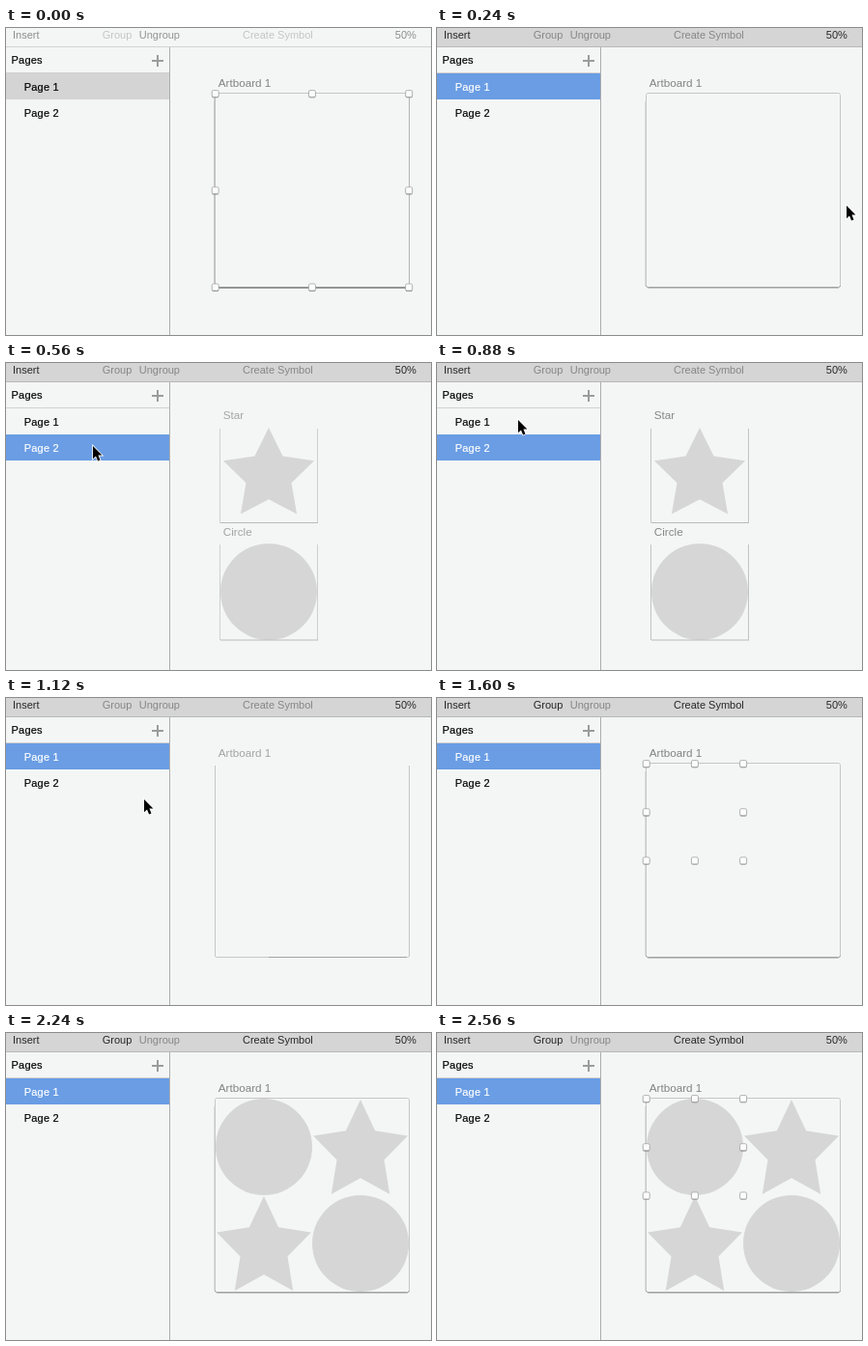
These frames come from a looping animation (440 by 318 pixels, 2880 ms). An HTML page:

```html
<!DOCTYPE html>
<html lang="en">
<head>
<meta charset="utf-8">
<title>Symbol pages</title>
<style>
html, body { margin: 0; width: 100%; height: 100%; overflow: hidden; background: #f4f6f5; }
svg { display: block; width: 440px; height: 318px; }
text { font: 11px "Liberation Sans", Arial, sans-serif; }
.side text { letter-spacing: .18px; fill: #000; stroke: #000; stroke-width: .2px; }
.name { font-size: 11.7px; fill: #828282; }
.shape { fill: #d6d6d6; }
.line { fill: none; stroke: #c6c6c6; }
.base { stroke: #a2a2a2; }

/* 80 ms is 2.7778 % of the loop */
svg * { animation: 2880ms step-end infinite; }
.bar { animation-name: bar; }
.edge { animation-name: edge; }
.dark { animation-name: dark; }
.action { animation-name: action; }
.ungroup { animation-name: ungroup; }
.row1 { animation-name: row1; }
.row2 { animation-name: row2; }
.side .label1 { animation-name: label1; }
.side .label2 { animation-name: label2; }
.board { animation-name: board; }
.full { animation-name: full; }
.faint { animation-name: faint; }
.boardName { animation-name: boardName; }
.boardHandles { animation-name: boardHandles; }
.symbols { animation-name: symbols; }
.symbols .name { animation-name: symbolName; }
.symbols .line { animation-name: symbolLine; }
.fill { animation-name: fill; }
.pick { animation-name: pick; }
.cursor { animation-name: cursor; }

@keyframes bar { 0% { fill: #f4f6f5; } 8.333%, 100% { fill: #d5d5d5; } }
@keyframes edge { 0% { fill: #d2d2d2; } 8.333%, 100% { fill: #b9b9b9; } }
@keyframes dark { 0% { fill: #8c8c8c; } 8.333%, 100% { fill: #262626; } }
@keyframes action { 0% { fill: #c4c4c4; } 8.333% { fill: #868686; } 55.556%, 100% { fill: #262626; } }
@keyframes ungroup { 0% { fill: #929292; } 8.333%, 100% { fill: #868686; } }
@keyframes row1 {
  0% { fill: #d4d4d4; } 8.333% { fill: #6a9de4; }
  19.444% { fill: transparent; } 38.889%, 100% { fill: #6a9de4; }
}
@keyframes row2 { 0% { fill: transparent; } 19.444% { fill: #6a9de4; } 38.889%, 100% { fill: transparent; } }
@keyframes label1 {
  0% { fill: #000; stroke: #000; } 8.333% { fill: #fff; stroke: #fff; }
  19.444% { fill: #000; stroke: #000; } 38.889%, 100% { fill: #fff; stroke: #fff; }
}
@keyframes label2 {
  0% { fill: #000; stroke: #000; } 19.444% { fill: #fff; stroke: #fff; }
  38.889%, 100% { fill: #000; stroke: #000; }
}
@keyframes board { 0% { visibility: visible; } 19.444% { visibility: hidden; } 38.889%, 100% { visibility: visible; } }
@keyframes full { 0% { opacity: 1; } 38.889% { opacity: 0; } 41.667%, 100% { opacity: 1; } }
@keyframes faint { 0% { opacity: 0; } 38.889% { opacity: 1; } 41.667%, 100% { opacity: 0; } }
@keyframes boardName { 0% { fill: #828282; } 38.889% { fill: #a3a3a3; } 41.667%, 100% { fill: #828282; } }
@keyframes boardHandles { 0% { opacity: 1; } 8.333%, 100% { opacity: 0; } }
@keyframes symbols { 0% { opacity: 0; } 19.444% { opacity: 1; } 38.889%, 100% { opacity: 0; } }
@keyframes symbolName { 0% { fill: #a3a3a3; } 22.222%, 100% { fill: #868686; } }
@keyframes symbolLine { 0% { stroke: #cfcfcf; } 22.222%, 100% { stroke: #c2c2c2; } }
@keyframes fill { 0% { opacity: 0; } 77.778%, 100% { opacity: 1; } }
@keyframes pick { 0% { opacity: 0; } 55.556% { opacity: 1; } 77.778% { opacity: 0; } 88.889%, 100% { opacity: 1; } }
@keyframes cursor {
  0% { opacity: 0; transform: translate(424px, 184px); }
  8.333% { opacity: 1; transform: translate(424px, 184px); }
  11.111% { transform: translate(345px, 160px); }
  13.889% { transform: translate(220px, 122px); }
  16.667% { transform: translate(122px, 94px); }
  19.444% { transform: translate(90px, 86px); }
  25% { transform: translate(89px, 84px); }
  27.778% { transform: translate(86px, 70px); }
  30.556% { transform: translate(84px, 59px); }
  38.889% { transform: translate(143px, 105px); }
  41.667% { transform: translate(190px, 114px); }
  44.444% { transform: translate(232px, 118px); }
  47.222% { transform: translate(256px, 119px); }
  50% { opacity: 1; transform: translate(265px, 119px); }
  55.556%, 100% { opacity: 0; transform: translate(265px, 119px); }
}
</style>
</head>
<body>
<svg viewBox="0 0 440 318">
  <defs>
    <g id="handle">
      <rect x="-3.5" y="-2.8" width="7" height="7" rx="1.5" fill="#777"/>
      <rect x="-3.5" y="-3.5" width="7" height="7" rx="1.5" fill="#fcfcfc" stroke="#a6a6a6" stroke-width=".8"/>
    </g>
  </defs>

  <rect width="440" height="318" fill="#f4f6f5"/>

  <g class="board">
    <g class="full">
      <path class="line" d="M216.5 268V69.5Q216.5 67.5 218.5 67.5H415.5Q417.5 67.5 417.5 69.5V268"/>
      <path class="line" d="M215.5 76V267" stroke-opacity=".5"/>
      <path class="line base" d="M216.5 267Q216.5 268.5 218.5 268.5H415.5Q417.5 268.5 417.5 267"/>
      <path class="line" d="M218 269.5H416"/>
    </g>
    <g class="faint">
      <path class="line" d="M216.5 70V267Q216.5 268.5 218.5 268.5H415.5Q417.5 268.5 417.5 267V70"/>
      <path class="line base" d="M272 268.5H415"/>
    </g>
    <text class="name boardName" x="219.8" y="61">Artboard 1</text>
    <g class="fill">
      <circle class="shape" cx="267" cy="118" r="50"/>
      <circle class="shape" cx="367" cy="218" r="50"/>
      <path class="shape" data-star="367 69 51.5 54.2"/>
      <path class="shape" data-star="267 169 51.5 54.2"/>
    </g>
    <g class="boardHandles">
      <path d="M216 269H418" stroke="#8a8a8a" stroke-width="1.6"/>
      <path d="M216 68V268M417.5 68V268" stroke="#b4b4b4"/>
      <g data-handles="100.25"></g>
    </g>
    <g class="pick" data-handles="50.2"></g>
  </g>

  <g class="symbols">
    <text class="name" x="224.8" y="58">Star</text>
    <path class="shape" data-star="272 67 49.5 49.5"/>
    <path class="line" d="M221.5 68V165.5M322.5 68V165.5"/>
    <path d="M222 165.5H323" stroke="#b9b9b9"/>
    <text class="name" x="224.8" y="179">Circle</text>
    <circle class="shape" cx="272" cy="237" r="50"/>
    <path class="line" d="M221.5 188V287M322.5 188V287"/>
    <path d="M222 287H323" stroke="#b9b9b9"/>
  </g>

  <g class="side">
    <rect class="row1" y="47" width="169" height="27"/>
    <rect class="row2" y="74" width="169" height="27"/>
    <path d="M0 46.5H169" stroke="#d0d0d0"/>
    <path d="M169.5 20V318" stroke="#adadad"/>
    <text x="5.6" y="37">Pages</text>
    <path d="M151 34H163M157 28V40" stroke="#9b9b9b" stroke-width="2"/>
    <text class="label1" x="18.8" y="65">Page 1</text>
    <text class="label2" x="18.8" y="92">Page 2</text>
  </g>

  <rect class="bar" width="440" height="19"/>
  <rect class="edge" y="19" width="440" height="1"/>
  <text class="dark" x="7" y="11">Insert</text>
  <text class="action" x="99.7" y="11">Group</text>
  <text class="ungroup" x="137.8" y="11">Ungroup</text>
  <text class="action" x="245" y="11">Create Symbol</text>
  <text class="dark" x="402.8" y="11">50%</text>

  <path class="cursor" d="M0 0V13.2L3 10.4L5.1 15.4L7.5 14.4L5.4 9.6H9.4Z" stroke="#fff" stroke-width="1.6" paint-order="stroke"/>
</svg>
<script>
// Five-pointed star: top point x, y, then horizontal and vertical radius
for (const el of document.querySelectorAll('[data-star]')) {
  const [x, top, rx, ry] = el.dataset.star.split(' ').map(Number);
  const points = Array.from({ length: 10 }, (_, i) => {
    const r = i % 2 ? 0.5 : 1, a = i * Math.PI / 5;
    return `${x + rx * r * Math.sin(a)} ${top + ry - ry * r * Math.cos(a)}`;
  });
  el.setAttribute('d', `M${points.join('L')}Z`);
}

// Eight handles around a square that starts at the artboard corner
for (const el of document.querySelectorAll('[data-handles]')) {
  const step = +el.dataset.handles;
  for (let i = 0; i < 9; i++) {
    if (i === 4) continue;
    const x = 216.7 + i % 3 * step, y = 68 + Math.floor(i / 3) * step;
    el.insertAdjacentHTML('beforeend', `<use href="#handle" x="${x}" y="${y}"/>`);
  }
}
</script>
</body>
</html>
```
